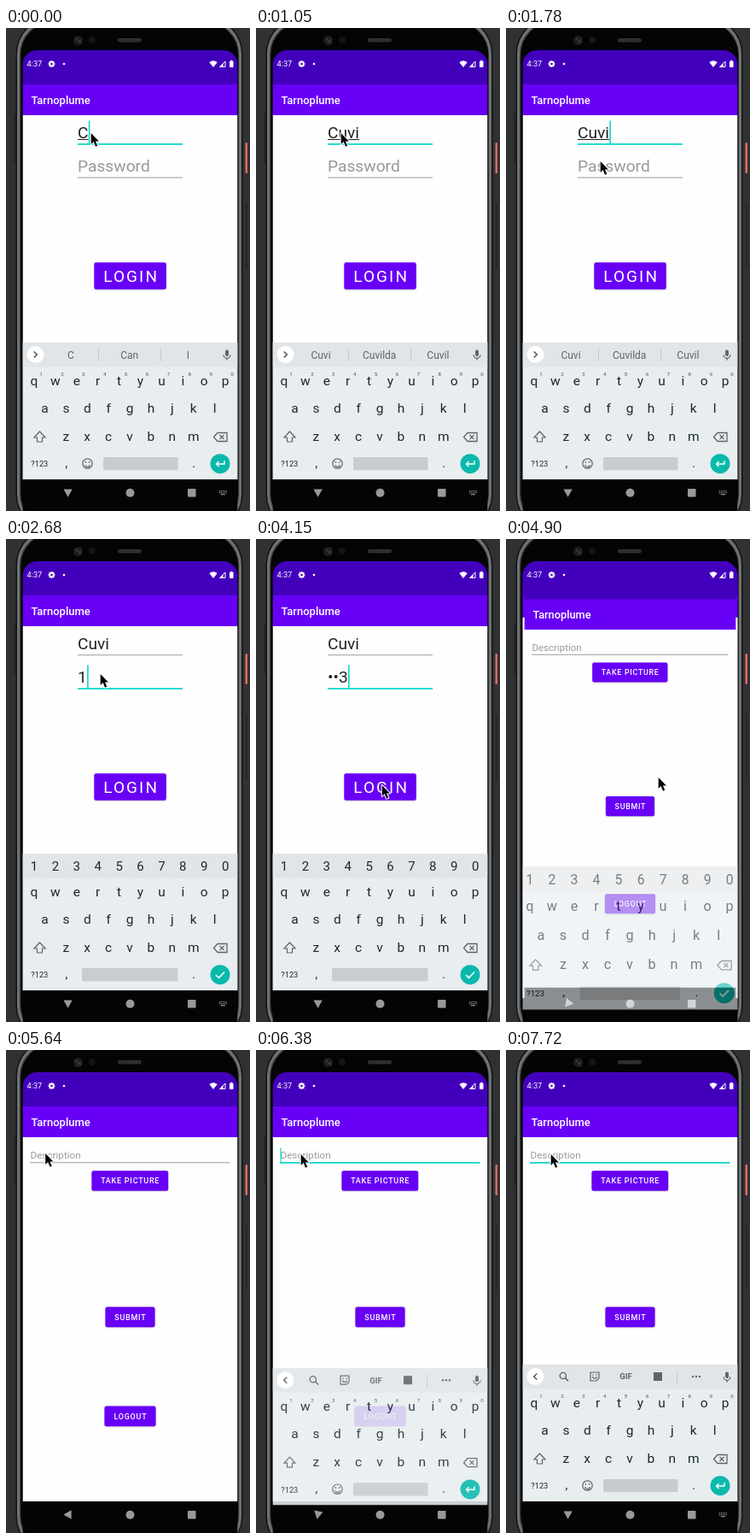
An HTML page with a canvas that plays this animation: 286x565 px, repeating every 8 s.

```html
<!DOCTYPE html>
<html lang="en">
<head>
<meta charset="utf-8">
<title>Login</title>
<style>
html, body { margin: 0; width: 100%; height: 100%; overflow: hidden; background: #303133; }
canvas { display: block; width: 286px; height: 565px; }
</style>
</head>
<body>
<canvas id="stage"></canvas>
<script>
const W = 286, H = 565, LOOP = 8000, STEP = 148.4;
const dpr = window.devicePixelRatio || 1;

function setup(canvas) {
  canvas.width = W * dpr;
  canvas.height = H * dpr;
  return canvas.getContext('2d');
}

const layer = document.createElement('canvas');
const layerCtx = setup(layer);
let ctx = setup(document.getElementById('stage'));

const PURPLE = '#6800f6', DEEP = '#4300bc', TEAL = '#0bd6c7', KEY = '#1d282c', GREY = '#5c656a';
const APP = 'Tarnoplume', USER = 'Cuvi';
const MID = { x: 145.5, y: 330 };

// Pointer path: step, x, y
const PATH = [
  [0, 99, 122], [7, 99, 122], [8, 100, 127], [10, 106, 143], [12, 110, 155], [14, 110, 157],
  [21, 110, 157], [24, 149, 214], [25, 158, 239], [26, 158, 262], [28, 147, 287], [30, 147, 287],
  [33, 178, 278], [36, 178, 278], [37, 116, 204], [38, 45.5, 120], [41, 52, 121], [60, 52, 121]
];

function rect(x, y, w, h, color, r = 0) {
  ctx.fillStyle = color;
  ctx.beginPath();
  ctx.roundRect(x, y, w, h, r);
  ctx.fill();
}

function disc(x, y, r, color) {
  ctx.fillStyle = color;
  ctx.beginPath();
  ctx.arc(x, y, r, 0, Math.PI * 2);
  ctx.fill();
}

function ring(x, y, r, color, width = 1.2, from = 0, to = Math.PI * 2) {
  ctx.strokeStyle = color;
  ctx.lineWidth = width;
  ctx.beginPath();
  ctx.arc(x, y, r, from, to);
  ctx.stroke();
}

function trace(points, closed) {
  ctx.beginPath();
  points.forEach(([x, y], i) => i ? ctx.lineTo(x, y) : ctx.moveTo(x, y));
  if (closed) ctx.closePath();
}

function poly(points, color) {
  trace(points, true);
  ctx.fillStyle = color;
  ctx.fill();
}

function line(points, color, width = 1.3, closed = false) {
  trace(points, closed);
  ctx.strokeStyle = color;
  ctx.lineWidth = width;
  ctx.stroke();
}

function text(str, x, y, size, color, { weight = 400, align = 'left', gap = 0 } = {}) {
  ctx.font = `${weight} ${size}px Roboto, sans-serif`;
  ctx.textAlign = align;
  ctx.letterSpacing = gap + 'px';
  ctx.fillStyle = color;
  ctx.fillText(str, x, y);
  const width = ctx.measureText(str).width;
  ctx.letterSpacing = '0px';
  return width;
}

const centered = (str, x, y, size, color, weight = 400) =>
  text(str, x, y, size, color, { weight, align: 'center' });

// Paints a part on its own layer, scaled about MID, and blends it as a whole
function group(alpha, scale, dy, paint) {
  const main = ctx;
  ctx = layerCtx;
  ctx.setTransform(1, 0, 0, 1, 0, 0);
  ctx.clearRect(0, 0, layer.width, layer.height);
  ctx.setTransform(dpr, 0, 0, dpr, 0, 0);
  ctx.translate(MID.x, MID.y + dy);
  ctx.scale(scale, scale);
  ctx.translate(-MID.x, -MID.y);
  paint();
  ctx = main;
  ctx.globalAlpha = alpha;
  ctx.drawImage(layer, 0, 0, W, H);
  ctx.globalAlpha = 1;
}

function phone() {
  rect(0, 0, W, H, '#303133');
  rect(9, 100, 2.5, 58, '#242527', 1);
  rect(280.5, 134, 2.5, 36, '#e2695c', 1);
  rect(281, 205, 2, 76, '#262729', 1);
  rect(11.5, -12, 266, 600, '#111213', 42);
  rect(13, -10.5, 263, 597, '#6f7173', 40.5);
  rect(16, -7.5, 257, 591, '#3a3c3e', 38);
  rect(17.3, -6.2, 254.9, 588.4, '#040405', 37);
  rect(131, 12, 28, 4.5, '#333436', 2);
  for (let x = 133; x < 158; x += 3) rect(x, 13, 1, 2.5, '#1a1b1c');
  disc(84.5, 14.5, 5.5, '#1d1e20');
  line([[82, 12], [87, 17], [87, 13.5]], '#3c3d40', 1.2);
  disc(101, 14, 4, '#131416');
}

function statusIcons() {
  text('4:37', 24.5, 45.3, 9.2, '#fff');
  for (let i = 0; i < 8; i++) {
    const a = i * Math.PI / 4;
    line([[53.5, 42], [53.5 + Math.cos(a) * 4, 42 + Math.sin(a) * 4]], '#fff', 1.6);
  }
  ring(53.5, 42, 2.3, '#fff', 1.6);
  disc(53.5, 42, 1.3, DEEP);
  disc(68, 42, 1.3, '#fff');
  ctx.fillStyle = '#fff';
  ctx.beginPath();
  ctx.moveTo(243, 46);
  ctx.lineTo(238.3, 40);
  ctx.quadraticCurveTo(243, 36.5, 247.7, 40);
  ctx.fill();
  line([[250.6, 45.4], [257, 45.4], [257, 39]], '#fff', 1, true);
  poly([[250, 46], [254.5, 46], [254.5, 41.5]], '#fff');
  rect(262, 38.7, 4.5, 7.3, '#fff', 0.8);
  rect(263.3, 37.7, 2, 1.5, '#fff');
}

function page() {
  rect(19.5, 26, 252, 42, DEEP);
  rect(19.5, 66, 252, 37, PURPLE);
  rect(19.5, 102, 252, 427, '#fefefe');
  rect(19.5, 528, 252, 40, '#040405');
  text(APP, 29.5, 89.2, 13, '#fff', { weight: 500 });
}

function button(x, y, w, h, label, size, gap, weight = 500) {
  ctx.save();
  ctx.shadowColor = 'rgba(0,0,0,.22)';
  ctx.shadowBlur = 2 * dpr;
  ctx.shadowOffsetY = dpr * 0.7;
  rect(x, y, w, h, PURPLE, 2.3);
  ctx.restore();
  text(label, x + w / 2 + gap / 2, y + h / 2 + size * 0.357, size, '#fff', { weight, align: 'center', gap });
}

function underline(x, y, w, focused) {
  if (focused) rect(x, y, w, 1.8, TEAL);
  else rect(x, y + 0.3, w, 1, '#9b9b9b');
}

function within(k, ...spans) {
  return spans.some(([a, b]) => k >= a && k <= b);
}

function loginPage(k) {
  page();
  const name = USER.slice(0, k < 1 ? 1 : k < 3 ? 2 : k < 4 ? 3 : 4);
  const onPass = k >= 13;
  const nameW = text(name, 84, 129, 19.2, '#222');
  if (!onPass) rect(84, 130, nameW, 1, '#222');
  if (within(k, [0, 6], [11, 12])) rect(84.3 + nameW, 108.5, 1.6, 27, TEAL);
  underline(84, 135, 123, !onPass);

  const pass = k < 18 ? '' : k < 19 ? '1' : k < 21 ? '•2' : k < 31 ? '••3' : '•••';
  const passW = pass ? text(pass, 84, 168, 19.2, '#222') : 0;
  if (!pass) text('Password', 84, 168, 19.2, '#999');
  if (within(k, [13, 15], [18, 24], [28, 30])) rect(84.3 + passW, 147.5, 1.6, 26.5, TEAL);
  underline(84, 174.3, 123, onPass);

  button(103.3, 274.3, 84.5, 31.4, 'LOGIN', 19, 2.1, 400);
  if (within(k, [30, 31])) rect(103.3, 274.3, 84.5, 31.4, 'rgba(255,255,255,.14)', 2.3);
}

function postPage(k) {
  page();
  text('Description', 28.5, 127.3, 11.7, '#9a9a9a');
  underline(28, 131, 234.5, k >= 42);
  if (within(k, [42, 44], [48, 51])) rect(28.4, 114.5, 1.2, 16.5, TEAL);
  button(100.4, 141.2, 89.8, 23.6, 'TAKE PICTURE', 9, 0.75);
  button(116.4, 300.6, 58.2, 23.6, 'SUBMIT', 9, 0.75);
  button(115.4, 416.6, 60.2, 23.6, 'LOGOUT', 9, 0.75);
}

function mic() {
  rect(257, 376.5, 4, 7.5, GREY, 2);
  ring(259, 382.3, 4, GREY, 1.2, 0, Math.PI);
  rect(258.4, 386, 1.2, 2.8, GREY);
}

function chevron(dir) {
  disc(34.5, 382, 10, '#fff');
  line([[34.5 - dir * 1.8, 378.5], [34.5 + dir * 1.8, 382], [34.5 - dir * 1.8, 385.5]], '#4b5054', 1.4);
}

function wordStrip(words) {
  chevron(1);
  words.forEach((word, i) => centered(word, 76 + i * 68.7, 386.8, 12, GREY));
  rect(108, 375, 1, 15, '#c5cacd');
  rect(181, 375, 1, 15, '#c5cacd');
  mic();
}

function toolStrip() {
  chevron(-1);
  ring(66.8, 381, 3.6, GREY, 1.4);
  line([[69.4, 383.6], [73, 387.3]], GREY, 1.6);
  line([[99, 377], [109, 377], [109, 384], [106, 387], [99, 387]], GREY, 1.2, true);
  ring(104, 382, 2.3, GREY, 1.1, 0, Math.PI);
  disc(102, 380, 0.8, GREY);
  disc(106, 380, 0.8, GREY);
  centered('GIF', 140.5, 385.4, 9.5, GREY, 700);
  rect(173, 377, 10, 10, GREY);
  rect(200, 375, 1, 15, '#c5cacd');
  [219, 223, 227].forEach(x => disc(x, 382, 1.2, GREY));
  mic();
}

function keyboard(mode, words) {
  const num = mode === 'num';
  rect(19.5, 368, 252, 160, '#e8edf0');
  rect(19.5, 368, 252, 28.5, '#e1e5e8');
  if (num) [...'1234567890'].forEach((c, i) => centered(c, 33 + i * 24.9, 388.2, 15, KEY));
  else if (mode === 'tools') toolStrip();
  else wordStrip(words);

  const rows = [['qwertyuiop', 33, 417.5], ['asdfghjkl', 45.5, 450.2], ['zxcvbnm', 70.3, 482.8]];
  for (const [keys, x, y] of rows)
    [...keys].forEach((c, i) => centered(c, x + i * 24.9, y, 15.5, KEY));
  if (!num) [...'1234567890'].forEach((c, i) => centered(c, 41 + i * 24.9, 407.3, 6.2, '#485257'));

  line([[39.5, 472], [46, 479], [42.5, 479], [42.5, 484], [36.5, 484], [36.5, 479], [33, 479]], GREY, 1.2, true);
  line([[243.5, 478.5], [248, 473.5], [259, 473.5], [259, 483.5], [248, 483.5]], GREY, 1.3, true);
  line([[250.5, 476], [255.5, 481]], GREY, 1.2);
  line([[255.5, 476], [250.5, 481]], GREY, 1.2);

  centered('?123', 39.3, 513.3, 9.3, KEY);
  centered(',', 71, 513.5, 14, KEY);
  centered('.', 220, 513.5, 14, KEY);
  const left = num ? 89 : 114;
  rect(left, 502, 201.5 - left, 15.2, '#c8ccce', 1.5);
  if (!num) {
    ring(95.5, 509.5, 5.7, GREY, 1.2);
    ring(95.5, 510.2, 3, GREY, 1.1, 0.2, Math.PI - 0.2);
    disc(93.4, 507.8, 0.9, GREY);
    disc(97.6, 507.8, 0.9, GREY);
  }
  disc(251, 509.7, 11.5, '#08b9ac');
  if (num) line([[246, 510], [249.5, 513.3], [256, 506.5]], '#fff', 1.6);
  else {
    line([[256, 506], [256, 510], [246.5, 510]], '#fff', 1.4);
    line([[249.5, 507], [246.5, 510], [249.5, 513]], '#fff', 1.4);
  }
}

// turn: 0 points left, 1 points down
function navBar(turn, color, ime) {
  ctx.save();
  ctx.translate(72.6, 543.5);
  ctx.rotate(-turn * Math.PI / 2);
  poly([[-5.3, 0], [4, -5.2], [4, 5.2]], color);
  ctx.restore();
  disc(145.5, 543.8, 5, color);
  rect(213, 539, 9.5, 9.5, color, 0.8);
  if (!ime) return;
  for (let i = 0; i < 5; i++) {
    rect(249.7 + i * 2, 541, 1.2, 1.2, '#8b8c8e');
    rect(249.7 + i * 2, 543, 1.2, 1.2, '#8b8c8e');
  }
  rect(251.7, 545, 5.2, 1.2, '#8b8c8e');
}

function pointer(k) {
  const i = PATH.findIndex(p => p[0] > k);
  const [k0, x0, y0] = PATH[i - 1], [k1, x1, y1] = PATH[i];
  const f = (k - k0) / (k1 - k0);
  ctx.save();
  ctx.translate(x0 + (x1 - x0) * f + 0.7, y0 + (y1 - y0) * f + 1);
  ctx.scale(0.92, 0.92);
  const arrow = [[0, 0], [0, 14], [3.2, 11], [5.8, 17], [8.2, 16], [5.7, 10.2], [10, 10.2]];
  ctx.lineJoin = 'round';
  line(arrow, '#fff', 2.2, true);
  poly(arrow, '#000');
  ctx.restore();
}

function suggestions(k) {
  if (k < 1) return ['C', 'Can', 'I'];
  if (k < 3) return ['Cu', 'Cup', 'Cut'];
  if (k < 4) return ['Cuv', 'Curve', 'Curves'];
  return [USER, USER + 'lda', USER + 'l'];
}

function draw(time) {
  const k = Math.floor((time + 9) / STEP);
  ctx.setTransform(dpr, 0, 0, dpr, 0, 0);
  phone();

  ctx.save();
  ctx.beginPath();
  ctx.roundRect(19.5, 26, 252, 600, [17, 17, 0, 0]);
  ctx.clip();

  let turn = 0, navColor = '#98999a', ime = false;
  if (k < 35) {
    // The new page grows in while the old one and its keyboard grow out
    const enter = { 32: [0.2, 0.89], 33: [1, 0.983], 34: [1, 0.998] }[k];
    const [alpha, scale, drop] = { 33: [0.6, 1.045, 13.5], 34: [0.15, 1.07, 22] }[k] || [1, 1, 0];
    group(1, scale, 0, () => loginPage(k));
    if (enter) {
      group(enter[0], enter[1], 0, () => postPage(k));
      rect(19.5, 26, 252, 40, DEEP);
    }
    group(alpha, scale, drop, () => keyboard(k < 14 ? 'words' : 'num', suggestions(k)));
    ime = k < 33;
    turn = ime ? 1 : k < 34 ? 0.55 : 0.1;
    if (k === 33) navColor = '#d2d3d4';
  } else {
    postPage(k);
    const rise = k < 42 ? 0 : k < 43 ? 0.4 : k < 44 ? 0.88 : 1;
    if (rise) group(rise, 1, (1 - rise) * 35, () => keyboard('tools'));
    turn = rise;
    ime = rise === 1;
  }
  statusIcons();
  navBar(turn, navColor, ime);
  ctx.restore();
  pointer(k);
}

function tick() {
  draw(performance.now() % LOOP);
  requestAnimationFrame(tick);
}
tick();
</script>
</body>
</html>
```
